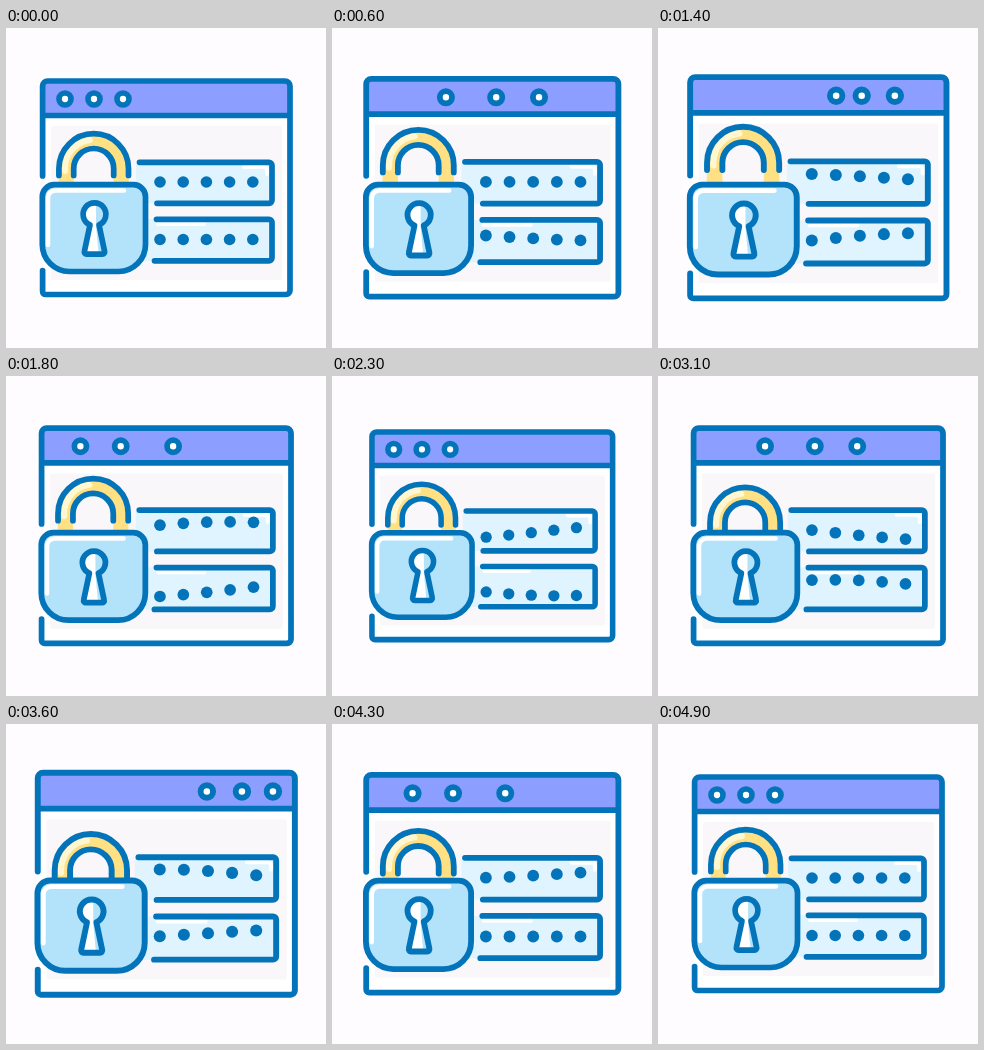
Recreate the animation shown at these times as an HTML page with a canvas. Size 320 by 320 pixels, loop 5000 ms.

```html
<!DOCTYPE html>
<html lang="en">
<head>
<meta charset="utf-8">
<title>Password lock</title>
<style>
  html, body { margin: 0; width: 100%; height: 100%; overflow: hidden; background: #fefcff; }
  canvas { display: block; width: 100vw; height: 100vh; }
</style>
</head>
<body>
<canvas id="stage"></canvas>
<script>
const SIZE = 320, LOOP = 5000, STEP = 100;
const BLUE = '#0474ba', SKY = '#b3e2fb', PALE = '#dff4fe', VIOLET = '#8c9eff';
const YELLOW = '#ffe183', CREAM = '#fff6d2', GREY = '#f9f7f9', PAGE = '#fefcff';

const canvas = document.getElementById('stage');
const ctx = canvas.getContext('2d');
const ratio = window.devicePixelRatio || 1;
canvas.width = canvas.height = SIZE * ratio;

// Keys are [time, value] pairs, eased in and out between neighbours.
function track(keys, t) {
  if (t <= keys[0][0]) return keys[0][1];
  for (let i = 1; i < keys.length; i++) {
    const [t0, a] = keys[i - 1], [t1, b] = keys[i];
    if (t < t1) {
      const u = (t - t0) / (t1 - t0);
      return a + (b - a) * u * u * (3 - 2 * u);
    }
  }
  return keys[keys.length - 1][1];
}

const ZOOM = [[0, 1], [1225, 1.04], [2450, 0.97], [3675, 1.04], [4900, 1]];
const LIFT = [[0, 0], [1150, -5.2], [3350, 6.6], [4900, 0]];
const WAVE = [[130, 0], [950, -8], [1985, 10], [3010, -8], [3800, 0]];
const SLIDES = [
  [[175, 0], [1185, 146], [1960, 0]],
  [[55, 0], [1115, 146], [2060, 0]],
  [[0, 0], [1045, 146], [2290, 0]]
];

function paint(path, fill, line) {
  if (fill) { ctx.fillStyle = fill; ctx.fill(path); }
  if (line) { ctx.strokeStyle = line; ctx.stroke(path); }
}

function shine(d, width, color) {
  ctx.save();
  ctx.lineWidth = width;
  paint(new Path2D(d), null, color);
  ctx.restore();
}

function box(x, y, w, h, r) {
  const p = new Path2D();
  p.roundRect(x, y, w, h, r);
  return p;
}

function disc(x, y, r) {
  const p = new Path2D();
  p.arc(x, y, r, 0, Math.PI * 2);
  return p;
}

const frame = box(36.6, 53, 247.4, 213.5, 5);
const border = new Path2D('M36.6 148V58a5 5 0 0 1 5-5H279a5 5 0 0 1 5 5V262.5a4 4 0 0 1-4 4H39.6a3 3 0 0 1-3-3V242.5M36.6 87.5H284');
const body = box(36.3, 156.7, 103.2, 86.8, [12, 12, 27, 27]);
const keyhole = new Path2D('M84 196.8A11.4 11.4 0 1 1 93 196.8L98.6 223.4a2.2 2.2 0 0 1-2.2 2.8H80.6a2.2 2.2 0 0 1-2.2-2.8Z');
const band = new Path2D('M52.7 175V140.5a35 35 0 0 1 70 0V175H107.7V140.5a20 20 0 0 0-40 0V175Z');
const arches = new Path2D('M52.9 147.5V140.5a34.8 34.8 0 0 1 69.6 0V147.5M67.7 147.5V140.5a20 20 0 0 1 40 0V147.5');

function drawWindow(t) {
  paint(frame, '#fff');
  paint(box(45, 98, 231, 154, 2), GREY);
  paint(box(37, 53, 247, 34.5, [4, 4, 0, 0]), VIOLET);
  paint(border, null, BLUE);
  SLIDES.forEach((keys, i) => {
    const shift = track(keys, t < 2500 ? t : t - 2535);
    paint(disc(59 + 29 * i + shift, 71, 6), '#fff', BLUE);
  });
}

function drawField(top, left, foot, height, highlight) {
  const low = top + height;
  paint(box(130, top, 136, height, 3), PALE);
  shine(highlight, 4, '#fff');
  paint(new Path2D(`M${left} ${top}H263a3 3 0 0 1 3 3V${low - 3}a3 3 0 0 1-3 3H${foot}`), null, BLUE);
}

function drawFields(t) {
  drawField(134.3, 133.5, 151, 41, 'M238 139H258a3 3 0 0 1 3 3V146');
  drawField(191.3, 150.5, 148.5, 41.5, 'M152 196H198');
  [154, 211.5].forEach((y, row) => {
    const start = row ? 0 : 570;
    for (let i = 0; i < 5; i++) {
      paint(disc(154 + 23.2 * i, y + track(WAVE, t - start - 100 * i), 5.8), BLUE);
    }
  });
}

function drawShackle(t) {
  ctx.save();
  ctx.translate(0, track(LIFT, t));
  paint(band, YELLOW);
  shine('M59 143V140.5A28.7 28.7 0 0 1 84 112', 6, CREAM);
  paint(arches, null, BLUE);
  ctx.restore();
}

function drawLock() {
  paint(body, SKY);
  shine('M42 217V170a7.5 7.5 0 0 1 7.5-7.5H118', 4.5, '#fff');
  paint(body, null, BLUE);

  paint(keyhole, '#fff');
  ctx.save();
  ctx.clip(keyhole);
  paint(new Path2D('M90 172H106V230H93L90 198Z'), SKY);
  ctx.restore();
  paint(keyhole, null, BLUE);
}

function draw(t) {
  ctx.setTransform(ratio, 0, 0, ratio, 0, 0);
  ctx.fillStyle = PAGE;
  ctx.fillRect(0, 0, SIZE, SIZE);
  const zoom = track(ZOOM, t);
  ctx.translate(160, 160);
  ctx.scale(zoom, zoom);
  ctx.translate(-160, -160);
  ctx.lineWidth = 5.7;
  ctx.lineCap = ctx.lineJoin = 'round';
  drawWindow(t);
  drawFields(t);
  drawShackle(t);
  drawLock();
}

function tick() {
  const t = performance.now() % LOOP;
  draw(Math.floor(t / STEP) * STEP);
  requestAnimationFrame(tick);
}
tick();
</script>
</body>
</html>
```
